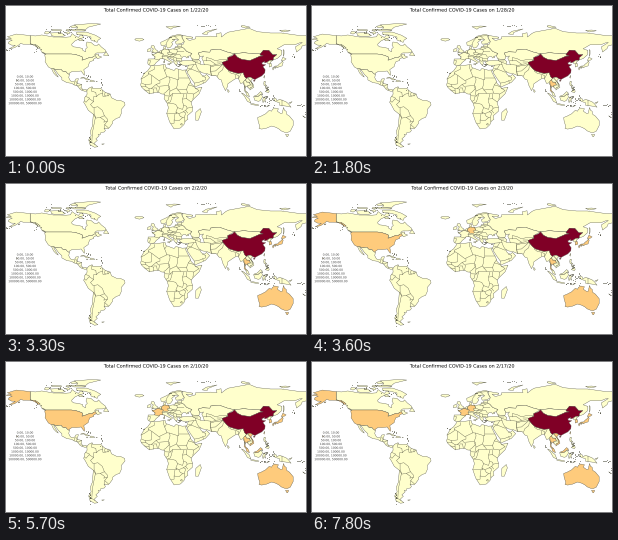
Animation, 300 px wide and 150 px high, one loop 8000 ms. Source, as a matplotlib script:

```python
import numpy as np
import matplotlib.pyplot as plt
from matplotlib.animation import FuncAnimation
from matplotlib.patches import PathPatch
from matplotlib.textpath import TextPath
from matplotlib.transforms import Affine2D

W, H, DPI = 300, 150, 100
TICK_MS, LOOP_MS, DAY_MS = 100, 8000, 300
PALE, ORANGE, DARK, EDGE = "#ffffcc", "#fecb7c", "#800026", "#4a4a3c"
LINE = 0.24

# Day on which each country passes ten cases.
FIRST_DAY = {"Thailand": 6, "Japan": 8, "Singapore": 8, "South Korea": 10,
             "Australia": 10, "US": 12, "Germany": 12, "Taiwan": 13,
             "Malaysia": 14, "France": 17, "Vietnam": 17}
counted = {name: [] for name in FIRST_DAY}

fig = plt.figure(figsize=(W / DPI, H / DPI), dpi=DPI, facecolor="white")
ax = fig.add_axes([0, 0, 1, 1])
ax.set(xlim=(0, W), ylim=(H, 0))
ax.axis("off")


def project(lonlat):
    pts = np.reshape(lonlat, (-1, 2))
    return 150.2 + 0.894 * pts[:, 0], 91.8 - 0.894 * pts[:, 1]


def land(*lonlat, name=None, color=PALE):
    patch, = ax.fill(*project(lonlat), fc=color, ec=EDGE, lw=LINE, joinstyle="round")
    if name:
        counted[name].append(patch)


def border(*lonlat):
    ax.plot(*project(lonlat), color=EDGE, lw=LINE)


def text_path(text, x, y, size):
    path = TextPath((0, 0), text, size=size, prop={"family": "DejaVu Sans"})
    box = path.get_extents()
    return path.transformed(Affine2D().translate(-(box.x0 + box.x1) / 2, 0)
                            .scale(1, -1).translate(x, y))


# North and Central America
land(-141, 60.3, -141, 69.6, -135, 69.2, -128, 70.3, -124, 69.6, -115, 68, -108, 68,
     -101, 67.8, -96, 68.2, -94, 71.8, -91, 69.5, -87, 67.5, -85.5, 69.5, -82, 69.5,
     -81.5, 67.2, -86, 66, -91, 63.5, -94.5, 60, -94.5, 58.8, -92.5, 57, -88, 56.5,
     -82.4, 55.2, -82, 53, -79, 51.5, -79, 54.5, -77, 56.5, -78.5, 59, -77.5, 62.4,
     -73, 62, -69.5, 59, -66, 58.5, -64.5, 60.3, -61.5, 57, -57, 53.5, -56, 51.5,
     -60, 50.2, -66.5, 50.2, -69, 48.5, -64.5, 49, -65, 47.2, -61, 45.6, -65.5, 43.6,
     -67, 45, -67.8, 47, -70, 46.5, -71.5, 45, -74.7, 45, -79, 43.3, -83, 42,
     -82.5, 45.5, -84.5, 46.5, -89, 48, -95, 49, -123, 49, -127.5, 51, -130, 54.5,
     -130, 56, -135, 59.5, -139, 60)
land(-124.7, 48.4, -123, 49, -95, 49, -89, 48, -84.5, 46.5, -82.5, 45.5, -83, 42,
     -79, 43.3, -74.7, 45, -71.5, 45, -70, 46.5, -67.8, 47, -67, 45, -70.5, 43,
     -70, 41.7, -74, 40.5, -75.5, 37.5, -76, 35, -81, 31.5, -80, 26.8, -80.5, 25.2,
     -82.5, 28, -84, 30, -89.5, 29.3, -94, 29.5, -97.2, 27.5, -97.2, 25.9, -99.5, 27.5,
     -101.5, 29.8, -103, 29, -104.5, 29.6, -106.5, 31.8, -111, 31.3, -114.8, 32.5,
     -117.1, 32.5, -120.6, 34.5, -122.5, 37.5, -124.3, 40.4, -124, 44, name="US")
land(-141, 69.6, -156.5, 71.3, -163, 69.3, -166.5, 68.3, -162, 66.5, -168, 65.6,
     -161, 64.5, -164.5, 63, -165.5, 61, -162, 59, -157.5, 58.7, -164.5, 54.7,
     -158.5, 56, -153.8, 59, -151.5, 61, -149, 60, -144.5, 60, -139.5, 59.8,
     -136, 58.3, -131, 55, -130, 56, -135, 59.5, -139, 60, -141, 60.3, name="US")
land(-156, 20.2, -154.9, 19.5, -155.8, 19, name="US")
land(-154.5, 57.3, -152.3, 58.2, -153.5, 56.9, name="US")
land(-117.1, 32.5, -114.8, 32.5, -111, 31.3, -106.5, 31.8, -104.5, 29.6, -103, 29,
     -101.5, 29.8, -99.5, 27.5, -97.2, 25.9, -97.8, 22.5, -96, 19, -94.5, 18.2,
     -91, 18.8, -90, 21, -87, 21.5, -88.5, 16, -83.3, 15, -83.7, 11, -81.5, 8.8,
     -79.5, 9.5, -77.3, 8.6, -78, 7.3, -80, 7.3, -83, 8.3, -85.7, 10, -87.6, 13,
     -92, 14.5, -94.5, 16.2, -100, 17, -105.5, 20, -105.5, 22.5, -109.3, 26,
     -113, 31.2, -114.7, 31.5, -112, 27, -109.5, 23.2, -112, 24.8, -115, 28, -116, 30.5)
border(-92, 14.5, -91, 17.8, -89, 17.8, -88.5, 16, -89.3, 14.4, -87.6, 13, -83.3, 15)
border(-85.7, 11, -83.7, 11)
border(-83, 8.3, -82.5, 9.5)

# Arctic and Caribbean islands
land(-62, 66.5, -68, 70, -78, 73.5, -89, 73.5, -89, 71, -80, 70, -73, 68, -73, 64.7,
     -66, 62, -65, 64.5)
land(-117, 69.5, -118, 72.5, -107, 73, -101.5, 69.5, -105, 68.8, -113, 68.6)
land(-125, 72, -124, 74.3, -118, 73.5, -122, 71.3)
land(-62, 82.5, -72, 83.1, -92, 81.5, -88, 79, -89, 76.5, -79, 76.3, -76, 79)
land(-80, 74.7, -92, 74.8, -96, 76.7, -88, 76.4, -80, 75.7)
land(-96, 80, -91, 81, -88, 79, -94, 78.3)
land(-117, 75.3, -116, 76.5, -106, 76, -106, 75)
land(-102, 72.8, -98, 74, -96, 73, -98, 71.4)
land(-100, 76.5, -97, 76.6, -95, 75.3, -101, 75)
land(-87, 65.5, -84, 66, -80.5, 63.7, -86, 63.8)
land(-59, 47.7, -56, 51.5, -53, 47, -56, 47)
land(-128, 50.7, -125, 50, -123.5, 48.4)
land(-84.8, 21.9, -82, 23.1, -74.3, 20.2, -77.6, 19.9, -81, 22.2)
land(-74.3, 18.4, -73, 19.9, -68.5, 18.6, -72, 18)
land(-78.3, 18.3, -76.3, 18.1, -77.3, 17.8)
land(-67.2, 18.4, -65.7, 18.3, -67, 18)

# South America
land(-77.3, 8.6, -75.5, 10.7, -71.7, 12.4, -71.5, 10.8, -68, 10.7, -62, 10.7, -60, 8.5,
     -57, 6, -51.5, 4.2, -50, 0, -44.5, -2.7, -40, -2.9, -35.3, -5.2, -34.9, -8,
     -39, -13, -39, -17.5, -41, -22, -44.5, -23, -48.5, -26, -48.8, -28.5, -52, -33,
     -54, -34.8, -58.3, -34, -56.8, -36.5, -58, -38.2, -62, -39, -62.3, -41, -65, -41,
     -63.7, -42.5, -67.5, -46, -65.8, -47.5, -69, -50.5, -68.3, -52.4, -65.2, -54.7,
     -69, -55.3, -74, -52.5, -75.5, -47, -72.8, -42.5, -73.6, -37.2, -71.5, -32,
     -70.3, -18.4, -76, -14, -79.5, -7.5, -81.2, -5, -80, -2.5, -80.2, 0, -78.8, 1.8,
     -77.3, 4, -77.5, 7)
border(-51.5, 4.2, -54, 2.3, -59.5, 1.5, -60, 5, -64, 4, -67, 1.2, -69.8, 1.5, -70, -4.2,
       -73.5, -7.5, -70.5, -11, -65.3, -10, -60.3, -14, -58, -20, -54.4, -24,
       -54.5, -26, -57.6, -30, -53.4, -33.7)
border(-70.3, -18.4, -68, -22, -70, -32, -71.5, -40, -72, -50, -68.4, -52.4)
border(-69.5, -11, -69.5, -17.5, -67.5, -22.7, -62.5, -22, -58, -20)
border(-62.5, -22, -57.8, -25.3, -58.6, -27.3, -54.5, -26)
border(-57.6, -30, -58.3, -34)
border(-80.3, -3.5, -78.5, -5, -75, -1, -70, -4.2)
border(-78.8, 1.5, -75, 0, -75, -1)
border(-71.7, 12, -72.5, 7.5, -67.5, 6, -67, 1.2)
border(-60, 8.5, -60.5, 5)
border(-57, 6, -58, 3, -56.5, 2)
border(-54, 5.8, -54, 2.3)
land(-61, -51.7, -58, -51.5, -60, -52.2)

# Africa
land(-5.9, 35.8, 0, 36, 10, 37.3, 11, 33.8, 15.2, 32.3, 20, 30.5, 22, 32.8, 29, 30.9,
     34.2, 31.2, 32.6, 29.9, 35.5, 24, 37.3, 21, 39, 16, 43.2, 12, 44, 10.5,
     51.2, 11.9, 48, 4.5, 41.6, -1.7, 39, -5, 40.6, -10.7, 40.6, -15, 34.8, -20,
     35.5, -24, 32.7, -26, 31, -30, 27, -33.8, 20, -34.8, 18.2, -32, 15, -27,
     11.8, -17.5, 13.7, -11, 12.2, -6, 8.8, -0.8, 9.6, 4, 6, 4.3, 2.5, 6.3, -4, 5.3,
     -7.6, 4.4, -13.2, 8.8, -16.7, 12.4, -17.4, 14.7, -16.2, 19, -17, 21, -13, 27.8,
     -9.8, 30, -6.8, 34)
border(-2, 35, -2, 32, -8.7, 28.7, -8.7, 26, -13, 23, -17, 21)
border(-8.7, 27.3, -4.8, 25, 3, 19.2, 12, 23.5, 9.5, 30, 8, 34, 8.5, 36.9)
border(9.5, 30, 11.5, 33)
border(25, 31.6, 25, 20, 15, 23.2, 12, 23.5)
border(25, 22, 36.8, 22)
border(-4.8, 25, -5.5, 15.5, -12, 14.8, -16.2, 16.2)
border(-12, 14.8, -11.4, 12.4, -16.7, 12.4)
border(-11.4, 12.4, -8, 10.2, -5.5, 10.4, 0, 15, 4.2, 16.5, 4.2, 19.2)
border(-13.2, 9, -10.5, 8, -8, 8, -8, 10.2)
border(-8, 8, -7.6, 4.4)
border(-5.5, 10.4, -2.8, 9.6, -3, 5.1)
border(-2.8, 11, 0.5, 11, 1.2, 6.1)
border(0, 15, 2.3, 12.5, 3.6, 11.7, 2.7, 6.3)
border(3.6, 13, 13.5, 13.7, 15.5, 20, 15, 23.2)
border(13.5, 13.7, 14.5, 10, 11, 6.5, 8.5, 4.7)
border(14.5, 13, 15.5, 7.5, 14.5, 5, 16, 2, 9.8, 2.2)
border(15.5, 7.5, 22.8, 11, 24, 16, 24, 20)
border(22.8, 11, 27.4, 5, 18.5, 5, 16, 2)
border(24, 8.7, 34, 9.5, 36, 14.5, 38.5, 18)
border(36, 14.5, 42.5, 12.5)
border(34, 9.5, 35, 5.3, 27.4, 5)
border(35, 5.3, 42, 4.2, 48, 8, 43, 11.3)
border(42, 4.2, 41, -1.7)
border(34, 4.2, 34, -1, 39.2, -4.7)
border(31, 4, 29.5, -1.4, 34, -1)
border(29.5, -1.4, 29.3, -4.4, 30.8, -8.3, 34, -9.5, 34.6, -11.6, 40.5, -10.5)
border(18.5, 4.5, 16, -4.5, 12.5, -5.9, 16.5, -6, 21.8, -7.3, 24, -11, 29.5, -13, 30.8, -8.3)
border(14.5, 2, 13.5, -2.5, 11, -4)
border(24, -11, 22, -16, 23.4, -17.6, 11.8, -17.2)
border(22, -16, 25.3, -17.8, 30.3, -15.6, 33, -14, 34.6, -11.6)
border(33, -14, 35.2, -17)
border(30.3, -15.6, 33, -17, 31.3, -22.4, 27, -21, 25.3, -17.8)
border(31.3, -22.4, 32, -26.8)
border(29.5, -22.2, 25.5, -25.6, 20, -24.8, 20, -28.4, 16.5, -28.6)
border(20, -24.8, 21, -18.2)
land(27, -29.6, 28.6, -28.6, 29.4, -29.6, 28, -30.6)
land(49.3, -12, 50.5, -15.7, 47.2, -25, 44, -25, 44.4, -16.2)

# Europe
land(28, 59.5, 24, 59, 24, 57.2, 21.2, 57, 21, 55, 18.5, 54.7, 14, 54, 10.8, 54.2,
     10.5, 57.6, 8.2, 57, 8.8, 54, 7, 53.5, 4.5, 52.5, 2, 51, -1.5, 49, -4.7, 48.4,
     -1.2, 46, -1.6, 43.5, -9, 43.4, -9.4, 38.8, -8.9, 37, -5.6, 36, -2, 36.8, 0, 39.5,
     3.2, 42, 4, 43.5, 8, 43.9, 10.4, 42.8, 15.6, 40, 16, 38, 17.2, 39, 18.4, 40.2,
     13.6, 43.6, 12.4, 45.3, 13.7, 45, 19.4, 42, 19.5, 40, 22, 36.7, 24, 38, 23, 40.3,
     26, 41, 29, 41.2, 28, 43.5, 30, 46, 33, 46, 34, 44.5, 36.5, 45.3, 35, 46.4,
     38, 47, 40, 49.5, 34, 52, 31, 55.5, 28, 57)
land(2, 51, -1.5, 49, -4.7, 48.4, -1.2, 46, -1.6, 43.5, 3.2, 42.3, 4, 43.5, 7.5, 43.8,
     6.5, 46.3, 8, 49, 4.5, 50, name="France")
land(8.6, 42.7, 9.5, 42.6, 9.2, 41.4, name="France")
land(7, 53.5, 8.8, 54, 8.7, 54.9, 10.8, 54.2, 14, 54, 15, 51, 12.3, 50.2, 13.8, 48.7,
     12.8, 47.6, 8, 47.6, 8, 49, 6.2, 49.7, 6, 51.8, name="Germany")
land(30, 69.7, 25.5, 71, 17, 69, 12.5, 65.5, 5, 62, 5.5, 58.8, 8, 58, 10.6, 59.3,
     12.8, 55.5, 16, 56.5, 18.5, 60, 17.3, 62, 22, 65.8, 25.3, 65, 21.2, 62.5,
     22.5, 60, 28, 60.5, 31.5, 63, 29, 67, 28.5, 69)
border(11.2, 59, 12.2, 63, 16, 67.5, 20.5, 69, 24, 65.8)
border(20.5, 69, 28.5, 69.5)
border(-8.8, 41.9, -6.5, 41.7, -7.3, 37.2)
border(2.5, 51, 6, 50, 6, 52)
border(14, 54, 15, 51, 19, 49.5, 22.6, 49, 23.6, 52, 23, 54.3, 19.5, 54.4)
border(6.5, 46, 10.5, 46.7, 13.5, 46.5, 16, 46.5, 17, 48.3, 13.8, 48.7)
border(13.7, 45.5, 16, 46.5, 19, 45.9, 22, 48, 17, 48.3, 19, 49.5)
border(19, 45.9, 22.5, 44.5, 28, 43.8)
border(22, 48, 26.5, 48.2, 28.2, 45.5)
border(22.5, 44.5, 22.8, 41.4, 26.3, 41.7)
border(15.8, 45.2, 19, 44.9, 20, 42, 21, 40.8, 22.8, 41.4)
border(23.6, 51.6, 31, 51.8)
border(21, 56.2, 25, 56.2, 26.5, 55.6, 23, 54)
border(24.3, 57.8, 27.5, 57.5)
border(26.5, 55.6, 28, 56.2)
land(-5.5, 50, 1, 51, 1.6, 52.7, 0, 53.5, -2, 56, -2, 57.6, -3.2, 58.6, -5, 58.5,
     -6, 56.5, -3, 54.5, -4.5, 53, -5, 51.7, -3, 51.3)
land(-10, 51.7, -6.3, 52.2, -5.7, 54.6, -7.5, 55.3, -9.8, 53.8)
land(-22.5, 64, -24, 65.5, -22, 66.4, -16, 66.4, -13.7, 65, -18.5, 63.4)
land(12.5, 37.8, 15.5, 38.2, 15, 36.7)
land(8.3, 40.8, 9.6, 41, 9.5, 39.2, 8.5, 39)
land(23.6, 35.5, 26.3, 35.2, 24.7, 34.9)
land(32.4, 35, 34.4, 35.6, 33, 34.6)
land(11, 79.5, 20, 80.3, 27, 80, 19, 78.5, 16.5, 76.7)

# Northern, western and central Asia
land(30, 69.7, 41, 67.8, 40, 66, 33.5, 66.7, 37, 64, 44, 66, 44, 68.3, 54, 68.5,
     60.5, 69, 68, 68.5, 67, 71.5, 72.5, 72.8, 73, 68, 78, 72, 81, 73.5, 104, 77.7,
     113, 74, 128, 72.5, 140, 72.5, 160, 69.7, 170, 69.5, 180, 69, 180, 65,
     177.5, 64.5, 179, 62.5, 170.5, 60, 163.3, 58, 162, 55, 157, 51.2, 155.7, 57,
     163.5, 61.8, 160.5, 61.5, 155, 59.3, 143, 59.3, 135.3, 54.8, 140.5, 53, 140, 48,
     135.5, 44, 130.7, 42.3, 131, 45, 134.8, 48.3, 130.5, 48, 126, 53, 120, 53.3,
     117, 49.6, 108, 49.3, 98, 50.5, 87.5, 49.2, 80, 51, 71, 54.2, 61, 53.5,
     60, 51, 52, 51.5, 47, 50, 49, 46, 47.5, 42.5, 40, 43.5, 38, 47, 40, 49.5, 34, 52,
     31, 55.5, 28, 57, 28, 59.5, 30.3, 60, 31.5, 63, 29, 67)
land(51.5, 71.5, 56, 74.5, 68, 77, 57.5, 73, 57, 70.7)
land(95, 79.5, 96, 81.2, 105, 79, 100, 78)
land(138, 75.5, 145, 75.8, 150, 75, 142, 73.6)
land(142, 54, 143, 53, 143, 49, 142.5, 46.2, 142, 50)
land(26, 40, 29, 41.2, 35, 42, 41, 41.5, 40, 43.5, 47.5, 42.5, 50, 40.3, 49, 37.5,
     53.8, 37, 53, 40, 51, 44.5, 53, 46.8, 49, 46, 47, 50, 52, 51.5, 60, 51, 61, 53.5,
     71, 54.2, 80, 51, 87.5, 49.2, 80, 45, 80.3, 42, 73.7, 39.5, 75, 37, 74, 35, 70, 32,
     69, 30, 66.5, 25.3, 61.6, 25.1, 57, 27, 51.5, 27.9, 48.5, 30, 50, 26.5, 51.5, 25,
     54, 24.2, 56.3, 26.2, 59.8, 22.5, 55, 17.2, 45, 12.8, 43, 13, 42.5, 16.7,
     39, 21.5, 34.8, 28, 34.2, 31.3, 36, 36.5, 31, 36.4, 27.5, 37)
border(41, 41.5, 44, 39.8, 44.5, 37.2, 36, 36.5)
border(41, 41.5, 46.5, 41.5)
border(44, 39.8, 46.5, 38.9, 48.8, 38.4)
border(44.5, 37.2, 46, 33, 48, 30)
border(42, 37, 39, 32.2, 36, 33)
border(35, 29.4, 37, 31.5, 39, 32.2, 47, 29, 48.4, 28.5)
border(42.7, 16.5, 47, 17, 52, 19, 55, 20, 55.5, 22.7, 51.5, 24.3)
border(52, 19, 53, 16.7)
border(53.8, 37.3, 61, 36.5, 61, 30, 61.6, 25.1)
border(53, 42, 56, 41.3, 56, 45, 61, 44, 66, 41.5, 71, 42.5, 80, 42.5)
border(56, 41.3, 60, 42, 66.5, 37.5, 61, 35.5)
border(66.5, 37.5, 71, 38, 75, 37.3)
border(67.5, 39.5, 73.7, 39.5)

# Southern and eastern Asia
land(61.6, 25.1, 67, 25, 70.3, 20.9, 72.8, 20, 74.5, 14, 77.5, 8, 80, 13, 80.2, 15.7,
     86.5, 20, 90, 22, 92, 21.5, 94.3, 16, 97, 16.8, 98.5, 14, 98.7, 10.2, 99, 13,
     98, 18, 100, 20.3, 101, 21.5, 98.7, 24, 97.5, 28, 92, 27.5, 88.5, 28, 81.5, 30.3,
     78.5, 33, 75, 37, 66, 36, 61, 34.5, 61, 30)
border(61, 29.7, 66.3, 30, 71, 34, 74, 36.8)
border(68.5, 24, 70, 28, 74.5, 31.5, 75, 35)
border(80.5, 30, 84, 27.3, 88, 26.5, 92, 27)
border(88.8, 22, 89, 26, 92, 25, 92, 21.5, 95, 27)
land(80, 9.5, 81.8, 7.3, 80.5, 6, 79.8, 8)
land(87.5, 49.2, 91, 45.2, 96, 42.8, 105, 41.7, 111.5, 44.5, 116, 46.5, 119.8, 46.8,
     116, 48, 117, 49.6, 108, 49.3, 98, 50.5)
land(73.7, 39.5, 80.3, 42, 80, 45, 85.5, 47, 87.5, 49.2, 91, 45.2, 96, 42.8, 105, 41.7,
     111.5, 44.5, 116, 46.5, 119.8, 46.8, 116, 48, 117, 49.6, 120, 53.3, 126, 53,
     130.5, 48, 134.8, 48.3, 131, 45, 130.7, 42.3, 126.5, 41.5, 124.3, 40, 121.3, 39,
     121.5, 40.8, 118, 39, 119, 37.3, 122.5, 37, 119.3, 35, 121.8, 31.5, 121.5, 28,
     118, 24.5, 113.5, 22.2, 110.3, 20.4, 108, 21.5, 105, 23.2, 102.2, 22.4, 101, 21.5,
     98.7, 24, 97.5, 28, 92, 27.5, 88.5, 28, 81.5, 30.3, 78.5, 33, 75, 37, color=DARK)
land(108.7, 19.3, 110.8, 20, 109.5, 18.2, color=DARK)
land(98, 18.5, 100, 20.3, 101, 17.7, 104.5, 17.5, 105.3, 14.4, 102.5, 13.6, 102.7, 11.8,
     101, 12.7, 100, 13.4, 99.3, 9.5, 100.5, 7.2, 102, 6.2, 101, 5.8, 100.2, 6.5,
     98.3, 8, 98.7, 10.2, 99.5, 11.8, 98.3, 15, name="Thailand")
land(100, 20.3, 101, 21.5, 102.2, 22.4, 104.8, 19.5, 107.5, 15.5, 107.5, 12.3, 105, 10.8,
     103.5, 10.6, 102.7, 11.8, 102.5, 13.6, 105.3, 14.4, 104.5, 17.5, 101, 17.7)
border(105.3, 14.4, 107.5, 14.4)
land(102.2, 22.4, 105, 23.2, 108, 21.5, 105.8, 19, 109, 14, 109.3, 11.8, 106.5, 10,
     104.8, 8.7, 105, 10.8, 107.5, 12.3, 107.5, 15.5, 104.8, 19.5, name="Vietnam")
land(100.2, 6.5, 102, 6.2, 103.4, 4, 104.2, 1.4, 101, 3, name="Malaysia")
land(109.7, 2, 113, 3.2, 116.8, 7, 119, 5, 117.5, 4.2, 115, 2.5, 114, 1.4, 111, 1,
     name="Malaysia")
land(103.7, 1.4, 104, 1.4, 103.9, 1.2, name="Singapore")
land(124.3, 40, 126.5, 41.5, 130.7, 42.3, 127.5, 39.7, 128.4, 38.6, 126.5, 37.8, 125, 38)
land(126.5, 37.8, 128.4, 38.6, 129.4, 36, 129, 35.2, 126.4, 34.4, name="South Korea")
land(130.9, 34, 133, 35.5, 136, 35.7, 137, 37.2, 140, 39.5, 141.3, 41.3, 142, 39.5,
     140.8, 35.7, 137, 34.6, 135.8, 33.5, 134.5, 34.7, name="Japan")
land(140, 41.6, 141.7, 45.4, 145.3, 43.5, 143.2, 42, name="Japan")
land(130, 33.5, 131.8, 33.4, 130.7, 31.1, name="Japan")
land(132.3, 33.7, 134.5, 34.2, 133, 32.8, name="Japan")
land(121.5, 25.2, 120.2, 23, 120.9, 22, name="Taiwan")

# South-east Asian islands and Oceania
land(95.3, 5.5, 98, 4.2, 104, -1, 105.8, -5.8, 102, -4, 98.7, 1.8)
land(105.3, -6.8, 108.5, -6.7, 114.4, -7.8, 114.4, -8.7, 108, -7.8)
land(109, 1.5, 111, 1, 114, 1.4, 117.5, 4.2, 119, 1, 116.5, -3, 114.5, -4, 110.2, -2.8)
land(119, -3, 120, 0.7, 125, 1.5, 120.3, 0.4, 123, -1, 121.5, -2, 122.5, -5, 120.5, -3,
     119.5, -5.5)
land(131, -0.8, 134, -0.9, 135, -3.3, 138, -1.7, 145, -4.3, 147.8, -6.5, 150.8, -10.5,
     147, -9.5, 143, -9, 138, -8.3, 138, -5.5, 133, -4)
border(141, -2.6, 141, -9.1)
land(123.5, -10.3, 127, -8.4, 124.5, -9)
land(148.5, -5.7, 152, -4.3, 150, -6.3)
land(120.3, 16, 120.7, 18.5, 122.2, 18.4, 121.6, 15.5, 124, 13, 120.7, 13.8)
land(122, 7, 125.5, 9.7, 126.4, 7.2, 125.5, 5.7)
land(122, 11.7, 123.3, 9.3, 125.2, 12.5, 123.8, 11)
land(113.5, -22, 114, -26, 115.8, -32, 115, -34.3, 118, -35, 123.5, -33.9, 129, -31.6,
     134, -33, 137.5, -35, 139.8, -37, 144, -38.7, 146.4, -39, 150, -37.3, 153.2, -31,
     153.2, -25.5, 149, -20.5, 146, -18.5, 145.3, -15, 143.5, -14, 142.5, -10.8,
     140.8, -17.5, 139, -17.4, 135.5, -15, 136.7, -12.2, 132.5, -11.4, 130, -13,
     129, -15, 126.5, -14, 122.2, -18, 117, -20.7, name="Australia")
land(144.7, -40.8, 148.2, -41, 147, -43.6, 146, -43.4, name="Australia")
land(164, -20.2, 167, -22.3, 165.5, -21.6)

# Small islands: centre, spread and number of each group
rng = np.random.default_rng(4)
for lon, lat, dlon, dlat, count in [
        (-100, 74, 12, 3, 24), (-78, 66, 4, 3, 8), (-133, 55, 2, 2, 8),
        (-165, 53.8, 3, 0.5, 7), (-74.5, -49, 0.8, 4, 14), (-62, 15, 0.8, 2.5, 8),
        (-76, 24, 2, 1.2, 7), (25.5, 37.5, 1.2, 1, 8), (127, -2, 3, 4, 20),
        (120, -8.6, 3, 0.4, 10), (123, 11, 1.5, 1.5, 8), (159, -8.5, 3, 1.5, 9),
        (167, -16, 0.7, 2, 5), (16, 67, 2, 1.2, 6), (55, 80.6, 4, 0.4, 9),
        (-16, 28.3, 1.5, 0.4, 4), (93, 11, 0.4, 2, 4), (153, 47, 2, 1.5, 6)]:
    x, y = project(rng.normal((lon, lat), (dlon, dlat), (count, 2)))
    ax.scatter(x, y, s=0.22, color=EDGE, lw=0)

limits = [0, 10, 50, 100, 500, 1000, 10000, 100000, 500000]
for row, (low, high) in enumerate(zip(limits, limits[1:])):
    label = text_path(f"{low:.2f}, {high:.2f}", 19, 71.6 + 3.8 * row, 2.9)
    ax.add_patch(PathPatch(label, fc="#3c3c3c", lw=0))

title = ax.add_patch(PathPatch(text_path("0", 150, 5.6, 4.75), fc="black", lw=0))


def date_label(day):
    month, number = (1, 22 + day) if day < 10 else (2, day - 9)
    return f"{month}/{number}/20"


def update(frame):
    day = frame * TICK_MS // DAY_MS
    title.set_path(text_path(f"Total Confirmed COVID-19 Cases on {date_label(day)}",
                             150, 5.6, 4.75))
    for name, patches in counted.items():
        for patch in patches:
            patch.set_facecolor(ORANGE if day >= FIRST_DAY[name] else PALE)
    return [title]


anim = FuncAnimation(fig, update, frames=LOOP_MS // TICK_MS, interval=TICK_MS,
                     repeat=True, blit=False)
plt.show()
```
